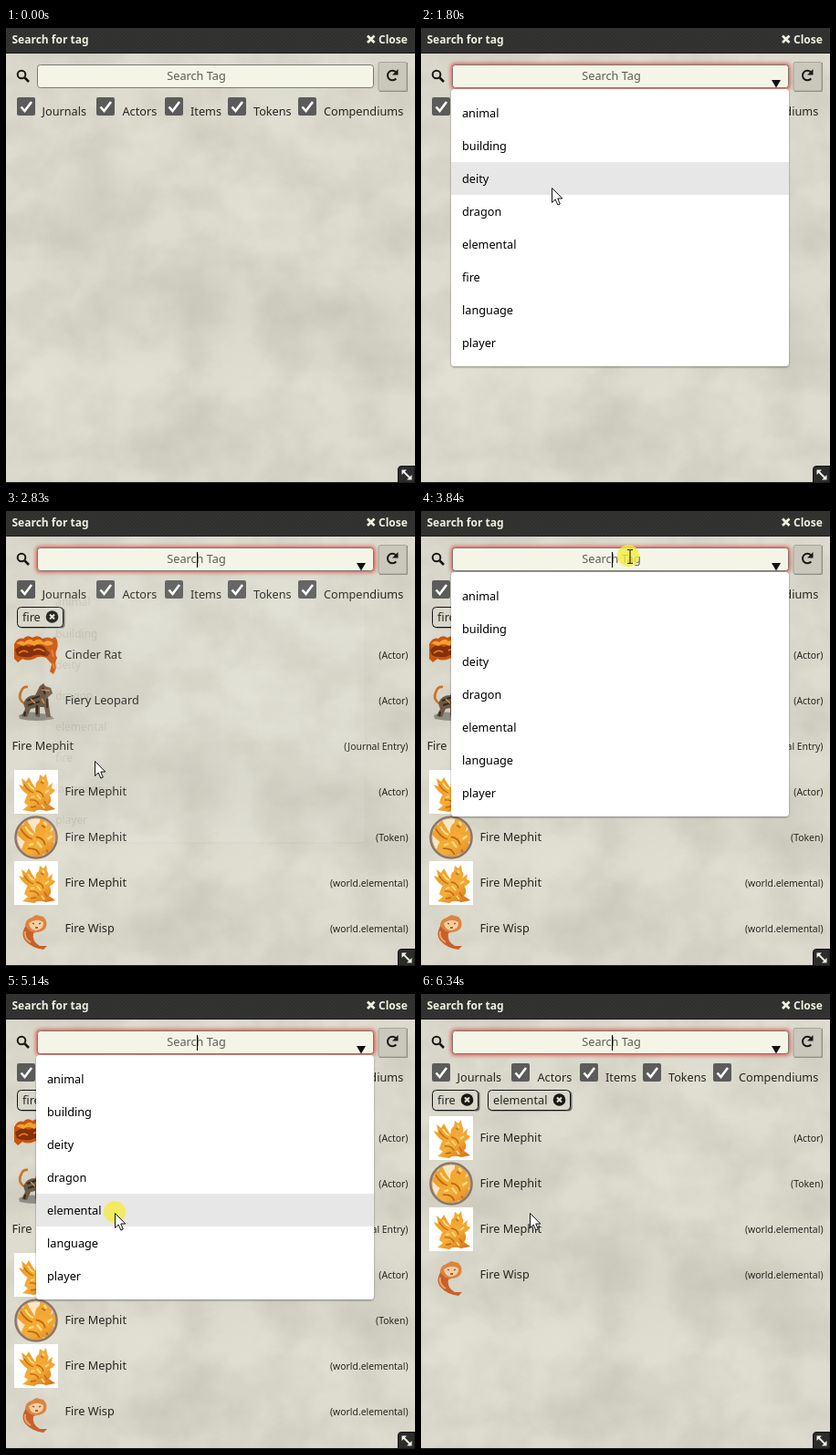
An HTML page for the animation above (6.8 s loop, 448 px wide and 499 px high).

```html
<!DOCTYPE html>
<html lang="en">
<head>
<meta charset="utf-8">
<title>Search for tag</title>
<style>
  html, body { margin: 0; width: 100%; height: 100%; overflow: hidden; background: #d9d8cc; }
  svg { position: absolute; left: 0; top: 0; }
  text { font: 12.7px "Noto Sans", "Open Sans", sans-serif; fill: #25251f; white-space: pre; }
  .bar { font-size: 12px; font-weight: 600; fill: #f0f0e0; }
  .kind { font-size: 10.4px; text-anchor: end; }
  .hint { text-anchor: middle; fill: #5c5c56; }
  .item { fill: #000; }
</style>
</head>
<body>
<svg width="448" height="499">
  <defs>
    <filter id="paper" x="0" y="0" width="100%" height="100%" color-interpolation-filters="sRGB">
      <feTurbulence type="fractalNoise" baseFrequency=".018 .02" numOctaves="6" seed="8"/>
      <feColorMatrix values="0 0 0 0 .5  0 0 0 0 .48  0 0 0 0 .4  .3 0 0 0 -.1"/>
    </filter>
    <filter id="soft" x="-100%" y="-100%" width="300%" height="300%"><feGaussianBlur stdDeviation="17"/></filter>
    <pattern id="weave" width="4" height="4" patternUnits="userSpaceOnUse">
      <path d="M0 4L4 0" stroke="#3b3b39" stroke-width=".7"/>
    </pattern>
  </defs>
  <rect width="448" height="499" fill="#dddccf"/>
  <rect width="448" height="499" filter="url(#paper)"/>
  <g id="stains" filter="url(#soft)"></g>
  <rect width="448" height="27" fill="#30302f"/>
  <rect width="448" height="27" fill="url(#weave)"/>
  <path d="M0 27.5H448M0 498.5H448" stroke="#1a1a19"/>
</svg>

<svg id="stage" width="448" height="499">
  <defs>
    <linearGradient id="fire" x1="0" y1="0" x2="1" y2="1">
      <stop offset="0" stop-color="#f0a02a"/><stop offset=".45" stop-color="#f5ae38"/><stop offset="1" stop-color="#cf6a10"/>
    </linearGradient>
    <filter id="glow" x="-10%" y="-60%" width="120%" height="220%"><feGaussianBlur stdDeviation="2"/></filter>
    <filter id="drop" x="-10%" y="-10%" width="120%" height="120%">
      <feDropShadow dx="0" dy="1" stdDeviation="1.3" flood-opacity=".4"/>
    </filter>
    <clipPath id="disc"><circle cx="24" cy="24" r="22"/></clipPath>

    <g id="beast">
      <path d="M0 12Q4 4 10 6 14 1 20 5 26 1 31 6 38 3 41 6L45 4Q49 10 47 17 44 23 47 27 44 33 46 38L43 45 39 42 41 34 35 27Q28 24 22 28 14 31 9 28L4 32 0 28Z" fill="#c9550f"/>
      <path d="M1 18Q8 11 16 15 25 10 33 15L39 22 36 26Q26 21 18 26 8 27 3 24Z" fill="#86300c"/>
      <path d="M2 11Q8 7 11 10 17 4 21 9 28 4 32 10 38 6 43 11 39 15 33 13 27 10 22 14 15 10 10 14Z" fill="#f2a033"/>
      <path d="M5 22Q10 17 15 21M21 19Q27 15 33 20M41 18L43 26M42 33L44 39" fill="none" stroke="#ec8421" stroke-width="1.6"/>
    </g>

    <g id="cat">
      <path d="M5 40Q18 34 28 38 40 38 44 44 24 48 6 44Z" fill="#8e8d84"/>
      <path d="M11 27Q3 22 8 13Q10 8 15 9" fill="none" stroke="#c8742b" stroke-width="2.6"/>
      <path d="M10 27Q13 18 23 18L28 8 32 5 34 8 40 10 42 16 37 20 38 29 40 42 35 42 33 31 28 31 28 42 23 41 23 32 18 33 14 42 8 41 12 33Z" fill="#6d5a46"/>
      <path d="M14 24L28 19M15 29L28 25M31 10L34 17M36 22L36 32M25 29L25 39M12 36L11 41" stroke="#322b26" stroke-width="2.2"/>
      <path d="M30 12L39 13M18 22L23 27M30 22L33 27" stroke="#cf8d4c" stroke-width="1.7"/>
    </g>

    <g id="imp">
      <path d="M20 30Q9 25 5 16L10 18 8 9 13 13 16 8 20 15 24 21Z" fill="#efa22c"/>
      <path d="M24 22Q22 14 27 11L28 5 32 8 35 4 36 11Q39 14 36 19L42 14 41 20 45 22Q42 27 37 28Z" fill="#f1a733"/>
      <path d="M13 30Q18 20 27 18 36 20 39 28 42 34 38 38L45 43 35 45Q26 42 22 46L9 44 15 39 11 36Z" fill="url(#fire)"/>
      <path d="M11 16Q15 23 21 25M29 13L32 15M24 23Q31 24 32 30M17 33Q25 32 27 38M33 34L36 39M18 41L24 40" fill="none" stroke="#bd6615" stroke-width="1.3"/>
      <path d="M15 14Q18 20 22 21M31 10L33 13M25 27L29 32M18 30L22 29M34 25L38 22M30 38L33 42" fill="none" stroke="#fddc83" stroke-width="1.8"/>
    </g>

    <g id="card"><rect width="48" height="48" fill="#fff"/><use href="#imp"/></g>

    <g id="token">
      <circle cx="24" cy="24" r="23" fill="#f8e6c6"/>
      <g clip-path="url(#disc)"><use href="#imp" transform="translate(-7 -6) scale(1.28)"/></g>
      <circle cx="24" cy="24" r="22.5" fill="none" stroke="#8b7565" stroke-width="2.6"/>
      <circle cx="24" cy="24" r="21" fill="none" stroke="#c4a78c" stroke-width=".8"/>
    </g>

    <g id="wisp">
      <path d="M13 20Q6 31 13 38 19 45 32 47L36 43 28 43Q19 38 21 29L30 26Z" fill="#c9602a"/>
      <path d="M12 27Q10 34 18 39" fill="none" stroke="#eba468" stroke-width="2"/>
      <path d="M12 21Q12 14 19 12L24 9 32 11Q38 17 34 24 28 30 18 27Z" fill="#dc8440"/>
      <path d="M16 18Q24 12 32 17 33 24 24 26 17 25 16 18Z" fill="#f3cfa4"/>
      <path d="M20 18L22 19M27 19L29 18M23 23H26" fill="none" stroke="#8a451f" stroke-width="1.3"/>
    </g>
  </defs>

  <text class="bar" x="6.500" y="17">Search for tag</text>
  <path d="M396 8.500L403.500 16M403.500 8.500L396 16" stroke="#f0f0e0" stroke-width="2.800"/>
  <text class="bar" x="408" y="17">Close</text>

  <g fill="none" stroke="#191813">
    <circle cx="17" cy="51" r="4.300" stroke-width="2"/>
    <path d="M20.500 54.500L25 59" stroke-width="2.600"/>
  </g>
  <rect id="halo" x="33" y="39" width="371" height="28" rx="4" fill="#e82020" opacity=".8" filter="url(#glow)"/>
  <rect x="34.500" y="40.500" width="368" height="25" rx="3" fill="#f5f5e7" stroke="#7a7971"/>
  <text class="hint" x="208.500" y="57">Search Tag</text>
  <path id="arrow" d="M384 57H394L389 65.500Z" fill="#111"/>
  <path id="caret" d="M209.500 45V62" stroke="#000"/>

  <rect x="408" y="37.500" width="31" height="31.500" rx="2" fill="#c9c8bb" stroke="#a5a499"/>
  <path d="M409 69.500H439.500V38" fill="none" stroke="#8f8e84"/>
  <path d="M427.300 55.500A5.300 5.300 0 1 1 427 48.200" fill="none" stroke="#191813" stroke-width="2"/>
  <path d="M429.500 45V51.500H423Z" fill="#191813"/>

  <g id="checks"></g>
  <g id="results"></g>
  <g id="chips"></g>

  <path d="M448 480.500H433Q429.500 480.500 429.500 484V499H448Z" fill="#2c2c2b" stroke="#111"/>
  <g stroke="#f0f0e8" fill="#f0f0e8"><path d="M435 486L443 494" stroke-width="2"/><path d="M433.500 484.500H439L433.500 490ZM444.500 495.500H439L444.500 490Z" stroke="none"/></g>

  <g id="popup">
    <rect id="sheet" x="33" y="67" width="370" rx="4" fill="#fff" filter="url(#drop)"/>
    <rect id="hover" x="33" width="370" height="36" fill="#e7e7e8"/>
    <g id="list"></g>
  </g>

  <circle id="press" r="12" fill="#f3ec3c" opacity=".78"/>
  <path id="pointer" d="M.5.5V16.500L4.200 13 6.800 19 9.300 18 6.800 12H11.800Z" fill="#fff" stroke="#111"/>
  <path id="beam" d="M-3-7.500H-1Q0-7.500 0-6.500 0-7.500 1-7.500H3M0-6.500V6.500M-3 7.500H-1Q0 7.500 0 6.500 0 7.500 1 7.500H3" fill="none" stroke="#222" stroke-width="1.100"/>
</svg>

<script>
const LOOP = 6800, ROW = 36, TOP = 75;
const $ = id => document.getElementById(id);
const show = (id, on) => $(id).setAttribute('visibility', on ? 'visible' : 'hidden');
const place = (id, x, y) => $(id).setAttribute('transform', `translate(${x} ${y})`);

// x, y, rx, ry of dark and light stains
const blots = (color, opacity, list) => list.map(([x, y, rx, ry]) =>
  `<ellipse cx="${x}" cy="${y}" rx="${rx}" ry="${ry}" fill="${color}" opacity="${opacity}"/>`).join('');
$('stains').innerHTML =
  blots('#a7a597', .25, [[100, 182, 34, 28], [75, 230, 30, 25], [215, 295, 34, 42], [310, 310, 40, 24], [390, 330, 40, 36], [200, 455, 70, 20], [120, 310, 36, 18]]) +
  blots('#eeeee2', .25, [[165, 130, 40, 25], [40, 400, 40, 45], [330, 110, 60, 20], [150, 385, 40, 24], [300, 410, 60, 22], [280, 200, 36, 30]]);

$('checks').innerHTML = [[12, 39.5, 'Journals'], [99, 127.5, 'Actors'], [174, 202, 'Items'], [243, 271, 'Tokens'], [320, 348, 'Compendiums']]
  .map(([x, tx, name]) => `<rect x="${x}" y="76" width="20" height="20" rx="2" fill="#5b5b5a"/>
    <path d="M${x + 4.5} 86.500l4 4.500 7.500-10" fill="none" stroke="#fff" stroke-width="2.600"/>
    <text x="${tx}" y="96">${name}</text>`).join('');

const world = '(world.elemental)', mephit = 'Fire Mephit';
const shared = [['card', mephit, '(Actor)'], ['token', mephit, '(Token)'], ['card', mephit, world], ['wisp', 'Fire Wisp', world]];
const found = [
  [],
  [['beast', 'Cinder Rat', '(Actor)'], ['cat', 'Fiery Leopard', '(Actor)'], ['', mephit, '(Journal Entry)'], ...shared],
  shared
];
const tags = [[12, 51, 'fire'], [73, 91, 'elemental']];
const words = ['animal', 'building', 'deity', 'dragon', 'elemental', 'fire', 'language', 'player'];

const resultRow = ([art, name, kind], i) => {
  const y = 134 + 50 * i;
  return (art ? `<use href="#${art}" x="9" y="${y}"/>` : '') +
    `<text x="${art ? 64.5 : 6.5}" y="${y + 28}">${name}</text><text class="kind" x="440.500" y="${y + 28}">${kind}</text>`;
};
const chip = ([x, w, name]) => `<rect x="${x + 1.5}" y="106.500" width="${w}" height="22" rx="4" opacity=".5"/>
  <rect x="${x + .5}" y="105.500" width="${w - 1}" height="22" rx="4" fill="#d8d7ca" stroke="#111"/>
  <text x="${x + 6}" y="121">${name}</text><circle cx="${x + w - 12.5}" cy="116" r="6.800" fill="#191813"/>
  <path d="M${x + w - 15} 113.500l5 5m0-5l-5 5" stroke="#e6e5d8" stroke-width="2"/>`;

let drawnTags = -1, drawnList = -1, sheetHeight;
function setTags(n) {
  if (n === drawnTags) return;
  drawnTags = n;
  $('results').innerHTML = found[n].map(resultRow).join('');
  $('chips').innerHTML = tags.slice(0, n).map(chip).join('');
}
function setList(second) {
  if (second === drawnList) return;
  drawnList = second;
  const names = second ? words.filter(w => w !== 'fire') : words;
  sheetHeight = names.length * ROW + 16;
  $('sheet').setAttribute('height', sheetHeight);
  $('list').innerHTML = names.map((w, i) => `<text class="item" x="45" y="${TOP + 23 + i * ROW}">${w}</text>`).join('');
}

// start, end, steps, target x, target y, ease-out power
const moves = [
  [130, 540, 7, 224, 50, 1.3],
  [1450, 2080, 10, 115, 218, 1.5],
  [2150, 2360, 4, 97, 274, 2.4],
  [2900, 3440, 9, 229, 50, 1.5],
  [4180, 4810, 10, 119, 240, 1.4]
];
function cursorAt(t) {
  let x = 440, y = 541;
  for (const [a, b, n, tx, ty, p] of moves) {
    if (t < a) break;
    const i = Math.min(n, Math.floor((t - a) / (b - a) * (n - 1) + 1.01));
    const e = 1 - (1 - i / n) ** p;
    x += (tx - x) * e;
    y += (ty - y) * e;
  }
  return [Math.round(x), Math.round(y)];
}

const presses = [[1000, 1130], [2560, 2690], [3640, 3910], [5140, 5270]];
const opens = [[1070, 2690], [3710, 5270]];
const blinks = [1000, 2690, 3710, 5280];

function popupAlpha(t) {
  for (const [a, b] of opens) {
    if (t >= a && t < b) return 1;
    if (t >= b && t < b + 210) return Math.max(0, 1 - Math.floor((t - b) / 70) * 70 / 150);
  }
  return 0;
}

// the list shrinks a little towards its middle while it fades
function drawPopup(alpha) {
  const s = .943 + .057 * alpha, cx = 218, cy = 67 + sheetHeight / 2;
  $('popup').setAttribute('transform', `translate(${cx * (1 - s)} ${cy * (1 - s)}) scale(${s})`);
  $('popup').setAttribute('opacity', alpha);
  show('popup', alpha > 0);
}

function draw(t) {
  const [x, y] = cursorAt(t);
  const focus = t >= 1000;
  const inField = x > 33 && x < 404 && y > 39 && y < 67;
  const alpha = popupAlpha(t);
  const row = Math.floor((y - 1 - TOP) / ROW);

  setTags(t < 2690 ? 0 : t < 5270 ? 1 : 2);
  setList(t >= 3000);
  show('halo', focus);
  show('arrow', focus || inField);
  const last = blinks.filter(b => b <= t).pop();
  show('caret', focus && Math.floor((t - last) / 530) % 2 === 0);

  drawPopup(alpha);
  show('hover', alpha > 0 && row >= 0 && row < 8);
  $('hover').setAttribute('y', TOP + row * ROW);

  show('press', presses.some(([a, b]) => t >= a && t < b));
  place('press', inField ? x - 2 : x, y - 1);
  show('pointer', t >= 130 && !inField);
  place('pointer', x, y);
  show('beam', t >= 130 && inField);
  place('beam', x, y);
}

const begin = performance.now();
function tick() {
  draw((performance.now() - begin) % LOOP);
  requestAnimationFrame(tick);
}
tick();
</script>
</body>
</html>
```
